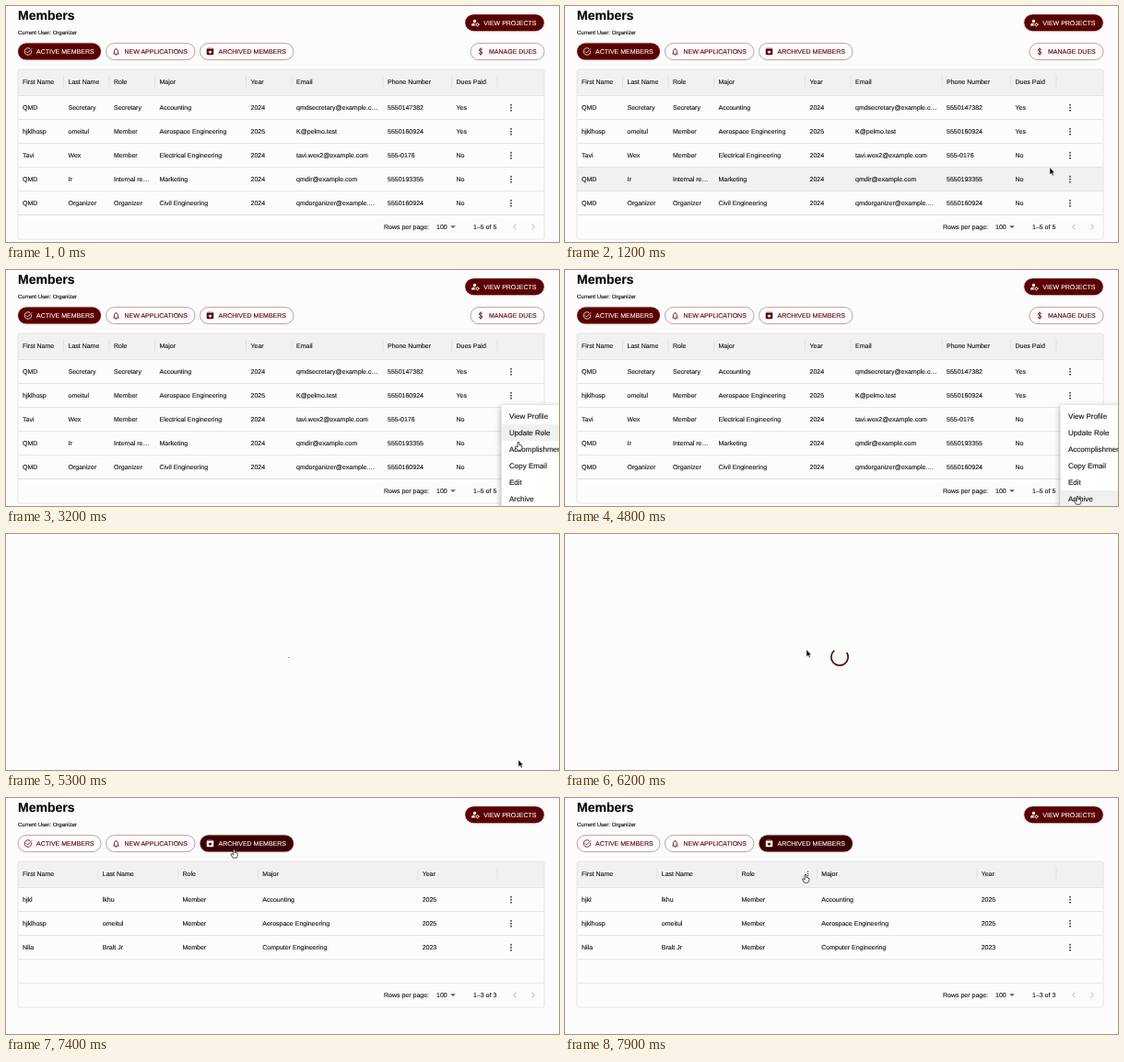
An HTML page that plays this animation: 600 by 257 pixels, repeating every 8 s.

```html
<!DOCTYPE html>
<html lang="en">
<head>
<meta charset="utf-8">
<title>Members</title>
<style>
  html, body { margin: 0; width: 100%; height: 100%; overflow: hidden; background: #fcfcfc; }
  svg { display: block; width: 100vw; height: 100vh; }
  text { font: 7px "Liberation Sans", Arial, sans-serif; fill: #111; stroke: #111; stroke-width: .12; text-rendering: geometricPrecision; }
  .title { font-size: 14px; font-weight: bold; fill: #000; }
  .small { font-size: 6px; fill: #000; }
  .item { font-size: 8px; }
  .line { stroke: #e0e0e0; stroke-width: .8; fill: none; }
  .shadow { filter: drop-shadow(0 .8px .8px #0004); }
  #menu { filter: drop-shadow(0 2px 3px #0006); transform-origin: 538px 147px; }
</style>
</head>
<body>
<svg id="stage" viewBox="0 0 600 257"></svg>
<script>
const LOOP = 8000, STEP = 100;
const MENU_OPEN = 2700, MENU_CLOSE = 4900, LOAD_START = 5300, LOAD_END = 6400, SHOW_ARCHIVE = 7300;
const MAROON = '#5a0000', DARK = '#3c0000';
const TOP = 97.5, ROW = 26;

const text = (x, y, s, cls = '') => `<text x="${x}" y="${y}" class="${cls}">${s}</text>`;
const line = (x1, y1, x2, y2) => `<path class="line" d="M${x1} ${y1}L${x2} ${y2}"/>`;
const dots = (x, y, r = .95, gap = 3) =>
  [-gap, 0, gap].map(d => `<circle cx="${x}" cy="${y + d}" r="${r}" fill="#444"/>`).join('');

// Icons live on a 24 unit grid; "ink" is the icon colour.
const icons = {
  check: () => '<path d="M20.6 10A9 9 0 1 1 17 4.5M6.8 11.6l3.8 3.8L21.5 4.5"/>',
  bell: () => '<path d="M5 18h14l-2-2v-5c0-7-10-7-10 0v5zM12 3v2M10.5 21h3"/>',
  box: ink => `<path fill="${ink}" fill-rule="evenodd" stroke="none"
    d="M6 3h12l3 3v13l-2 2H5l-2-2V6zM12 17.5 17.5 12H14v-2h-4v2H6.5zM5 5h14l-1-1H6z"/>`,
  dollar: () => '<path d="M16 7.5c-1-3-8-3-8 .8 0 4.5 8.5 2.5 8.5 7.2 0 4.2-8 4.2-9 0M12 2v20"/>',
  person: ink => `<circle cx="10" cy="8" r="4" fill="${ink}" stroke="none"/>
    <path fill="${ink}" stroke="none" d="M2 20v-3c0-2 4-4 9-4-2 3-1 5 0 7z"/>
    <circle cx="17" cy="17" r="3"/><circle cx="17" cy="17" r="4.6" stroke-dasharray="2 2.8"/>`
};

function button(x, y, w, icon, label, fill) {
  const ink = fill ? '#fff' : MAROON;
  return `<g><rect x="${x}" y="${y}" width="${w}" height="18" rx="9" fill="${fill || '#fcfcfc'}"
      stroke="${fill ? 'none' : '#ad7878'}" stroke-width=".7" class="${fill ? 'shadow' : ''}"/>
    <g transform="translate(${x + 6} ${y + 4}) scale(.417)" fill="none" stroke="${ink}" stroke-width="2">${icons[icon](ink)}</g>
    <text x="${x + 20}" y="${y + 11.5}" style="fill:${ink};stroke:${ink}">${label}</text></g>`;
}

const tabs = archived =>
  button(13, 40.6, 90, 'check', 'ACTIVE MEMBERS', archived ? '' : MAROON) +
  button(108.5, 40.6, 96.5, 'bell', 'NEW APPLICATIONS') +
  button(210.5, 40.6, 101.5, 'box', 'ARCHIVED MEMBERS', archived ? DARK : '') +
  (archived ? '' : button(504, 40.6, 80, 'dollar', 'MANAGE DUES'));

function table(columns, heads, rows) {
  const foot = TOP + ROW * Math.max(4, rows.length), mid = foot + 12.8;
  const cells = (values, y) => values.map((v, i) => text(columns[i] + 5, y, v)).join('');
  return cells(heads, 85) +
    [...columns.slice(1), 533].map(x => line(x, 76, x, 89)).join('') +
    rows.map((row, i) => {
      const y = TOP + ROW * i;
      return cells(row, y + 15.3) + dots(548, y + 13.2) + line(13, y + ROW, 584, y + ROW);
    }).join('') +
    line(13, foot, 584, foot) + line(13, TOP, 584, TOP) +
    `<rect class="line" x="13" y="69" width="571" height="${foot + 26.5 - 69}" rx="2"/>` +
    text(410, mid + 2.3, 'Rows per page:') + text(467, mid + 2.3, '100') +
    `<path d="M482.3 ${mid - 1}h5.4l-2.7 2.7z" fill="#555"/>` +
    text(507, mid + 2.3, `1–${rows.length} of ${rows.length}`) +
    `<path d="M553.3 ${mid - 2.5}l-2.6 2.7 2.6 2.7M570.7 ${mid - 2.5}l2.6 2.7-2.6 2.7" fill="none" stroke="#aaa"/>`;
}

const members = [
  ['QMD', 'Secretary', 'Secretary', 'Accounting', '2024', 'qmdsecretary@example.c…', '5550147382', 'Yes'],
  ['hjklhosp', 'omeitul', 'Member', 'Aerospace Engineering', '2025', 'K@pelmo.test', '5550160924', 'Yes'],
  ['Tavi', 'Wex', 'Member', 'Electrical Engineering', '2024', 'tavi.wex2@example.com', '555-0176', 'No'],
  ['QMD', 'Ir', 'Internal re…', 'Marketing', '2024', 'qmdir@example.com', '5550193355', 'No'],
  ['QMD', 'Organizer', 'Organizer', 'Civil Engineering', '2024', 'qmdorganizer@example.…', '5550160924', 'No']
];
const archive = [
  ['hjkl', 'lkhu', 'Member', 'Accounting', '2025'],
  ['hjklhosp', 'omeitul', 'Member', 'Aerospace Engineering', '2025'],
  ['Nila', 'Bralt Jr', 'Member', 'Computer Engineering', '2023']
];
const heads = ['First Name', 'Last Name', 'Role', 'Major', 'Year', 'Email', 'Phone Number', 'Dues Paid'];
const wide = [13, 62.5, 112, 161.5, 260.5, 310, 409, 483.5];
const views = [
  { rows: 5, html: tabs(false) + table(wide, heads, members) },
  { rows: 4, html: tabs(false) + table(wide, heads, members.filter((_, i) => i !== 1)) },
  { rows: 3, html: tabs(true) + table([13, 99.8, 186.5, 273.3, 446.7], heads.slice(0, 5), archive) }
];
const menuItems = ['View Profile', 'Update Role', 'Accomplishments', 'Copy Email', 'Edit', 'Archive'];

const stage = document.getElementById('stage');
stage.innerHTML = `
  <g id="page">
    ${text(13, 14.5, 'Members', 'title')}${text(13, 30.5, 'Current User: Organizer', 'small')}
    ${button(498.3, 9.2, 85.4, 'person', 'VIEW PROJECTS', MAROON)}
    <rect x="13" y="69" width="571" height="28.5" rx="2" fill="#f1f1f1"/>
    <rect id="rowHover" x="13" width="571" height="26" fill="#f1f1f1"/>
    <circle id="dotHover" cx="548" r="10" fill="#e2e2e2"/>
    ${views.map((v, i) => `<g id="view${i}">${v.html}</g>`).join('')}
    <g id="headDots">${dots(263.5, 82.5, .7, 2.3)}</g>
    <g id="menu">
      <rect x="537.5" y="147" width="90" height="125" rx="2" fill="#fff"/>
      <rect id="itemHover" x="537.5" width="90" height="18" fill="#f0f0f0"/>
      ${menuItems.map((s, i) => text(546, 162 + 18 * i, s, 'item')).join('')}
    </g>
  </g>
  <g id="spinner" transform="translate(298 134) scale(.4545)">
    <circle id="arc" r="20.2" fill="none" stroke="${MAROON}" stroke-width="3.6"/>
  </g>
  <g id="cursor">
    <path id="arrow" d="M0 0V7.5L1.8 6 3 8.8 4.2 8.3 3 5.6H5.2Z" fill="#000" stroke="#fff" stroke-width=".4"/>
    <path id="hand" transform="scale(.88)" d="M-1 1Q0-1 1 1V4Q4.5 4 4.5 6 4.5 9 3 10.5H-1.5L-4 6.5Q-4 5-2.5 5.5L-1 7Z"
      fill="#fff" stroke="#000" stroke-width=".8"/>
  </g>`;

const el = {};
stage.querySelectorAll('[id]').forEach(node => el[node.id] = node);
const show = (node, on) => node.style.display = on ? '' : 'none';
const clamp = v => Math.min(1, Math.max(0, v));
const ease = v => v * v * (3 - 2 * v);
const mix = (a, b, k) => a + (b - a) * k;

// CSS ease-in-out, cubic-bezier(.42, 0, .58, 1), solved by bisection
function easeInOut(x) {
  let low = 0, high = 1;
  for (let i = 0; i < 20; i++) {
    const u = (low + high) / 2, v = 1 - u;
    if (1.26 * u * v * v + 1.74 * u * u * v + u ** 3 < x) low = u; else high = u;
  }
  return ease(low);
}

// Pointer stops: time, x, y
const path = [
  [850, 515, 262], [1200, 526, 176], [1450, 526, 176], [1600, 532, 168], [1750, 532, 168],
  [2200, 548, 137], [2750, 548, 137], [3200, 556, 187], [3500, 556, 196], [3650, 556, 196],
  [4500, 556, 246], [5300, 556, 246], [6150, 262, 126], [6250, 262, 126], [6800, 247, 55],
  [7350, 247, 55], [7800, 261, 83], [LOOP, 261, 83]
];
function pointer(t) {
  const i = Math.max(1, path.findIndex(p => p[0] > t));
  const [t0, x0, y0] = path[i - 1], [t1, x1, y1] = path[i];
  const k = ease(clamp((t - t0) / (t1 - t0)));
  return [mix(x0, x1, k), mix(y0, y1, k)];
}

function drawSpinner(t) {
  const p = (t - LOAD_START) / 1400 % 1;
  const k = easeInOut(p * 2 % 1);
  const length = p < .5 ? mix(1, 100, k) : 100;
  const offset = p < .5 ? mix(0, 15, k) : mix(15, 125, k);
  el.arc.setAttribute('stroke-dasharray', `${length} 200`);
  el.arc.setAttribute('stroke-dashoffset', -offset);
  el.arc.setAttribute('transform', `rotate(${360 * p})`);
}

function draw(t) {
  const loading = t >= LOAD_START && t < LOAD_END;
  const view = t < LOAD_START ? 0 : t < SHOW_ARCHIVE ? 1 : 2;
  const [x, y] = pointer(t);
  show(el.page, !loading);
  show(el.spinner, loading);
  if (loading) drawSpinner(t);
  views.forEach((_, i) => show(el['view' + i], i === view));

  const menuOpen = t >= MENU_OPEN && t < MENU_CLOSE + 100;
  const grow = 1 - (1 - clamp((t - MENU_OPEN + 60) / 260)) ** 3;
  show(el.menu, menuOpen);
  el.menu.style.opacity = t < MENU_CLOSE ? grow : .5;
  el.menu.style.transform = `scale(${mix(.75, 1, grow)}, ${mix(.56, 1, grow)})`;
  const item = Math.floor((y - 151.5) / 18);
  show(el.itemHover, item >= 0);
  el.itemHover.setAttribute('y', 150 + 18 * item);

  const row = Math.floor((y - TOP) / ROW), rowMid = TOP + ROW * row + 13.2;
  const onRow = t >= 900 && !menuOpen && row >= 0 && row < views[view].rows;
  const onDots = onRow && Math.hypot(x - 548, y - rowMid) < 9;
  show(el.rowHover, onRow);
  show(el.dotHover, onDots);
  el.rowHover.setAttribute('y', TOP + ROW * row);
  el.dotHover.setAttribute('cy', rowMid);

  const onTab = x > 210 && x < 312 && y > 41 && y < 59;
  const onHead = view === 2 && y > 69;
  show(el.headDots, onHead);

  const hand = !loading && (onDots || onTab || (menuOpen && item >= 0) || (onHead && y > 78));
  show(el.cursor, t >= 900);
  show(el.hand, hand);
  show(el.arrow, !hand);
  el.cursor.setAttribute('transform', `translate(${x} ${y})`);
}

function tick() {
  draw(Math.floor(performance.now() % LOOP / STEP) * STEP);
  requestAnimationFrame(tick);
}
tick();
</script>
</body>
</html>
```
